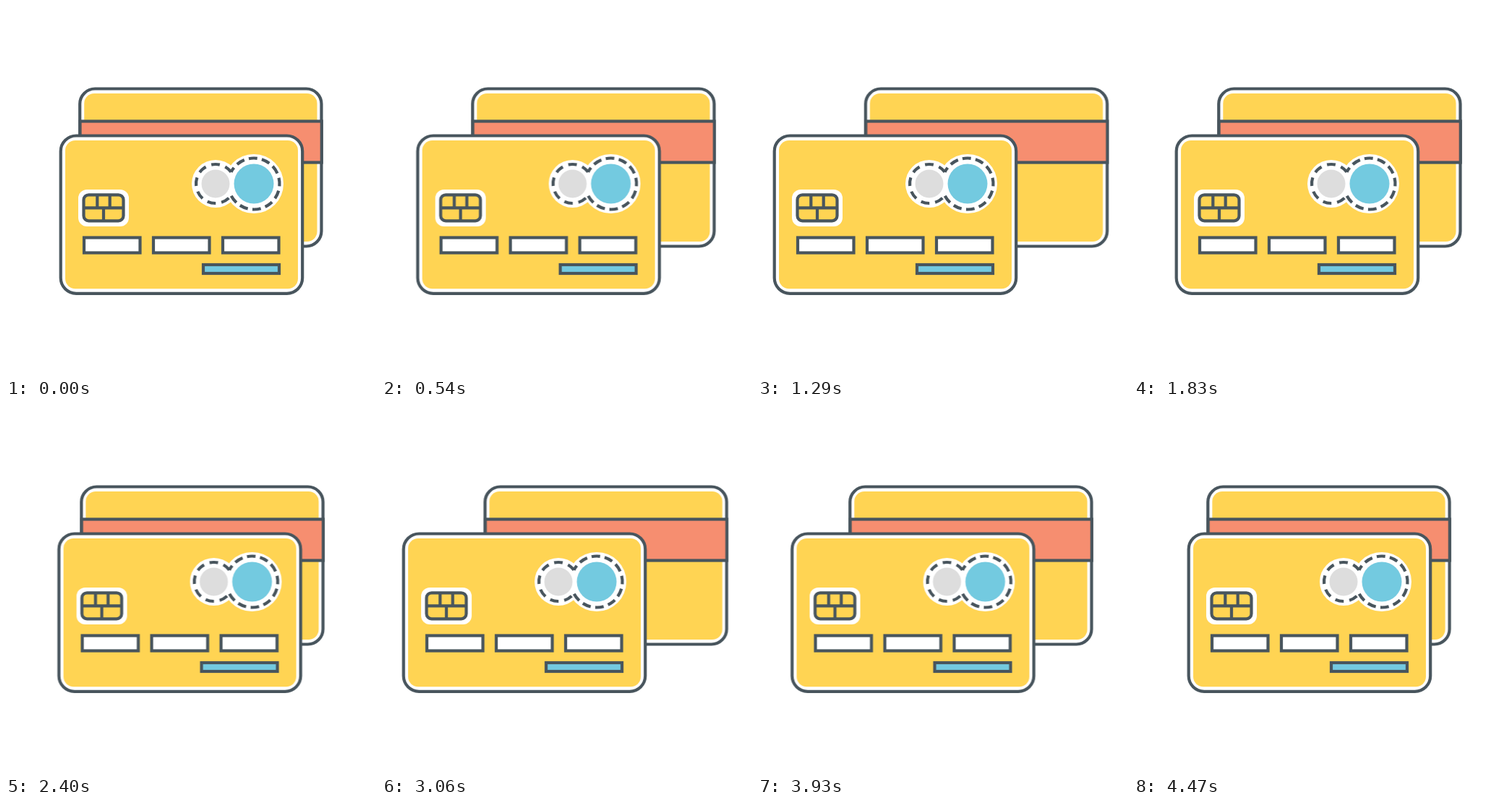
Recreate the animation shown at these times as an HTML page. Size 512 px wide and 512 px high, loop 4500 ms.

```html
<!DOCTYPE html>
<html lang="en">
<head>
<meta charset="utf-8">
<title>Bank cards</title>
<style>
  html, body { margin: 0; width: 100%; height: 100%; overflow: hidden; background: #fff; }
  svg { display: block; width: 100%; height: 100%; }
  .line { stroke: #48555d; stroke-width: 4.2; }
  .none { fill: none; }
  .white { fill: #fff; }
  .yellow { fill: #ffd453; }
  .coral { fill: #f68e70; }
  .blue { fill: #73cae0; }
  .grey { fill: #dddddd; }
  .card { animation: slide 1125ms cubic-bezier(.364, 0, .636, 1) infinite alternate; }
  .back { --shift: 49.3px; }
  .front { --shift: -56px; }
  @keyframes slide {
    from { transform: translateX(0); }
    to { transform: translateX(var(--shift)); }
  }
</style>
</head>
<body>
<svg viewBox="0 0 512 512">
  <g class="card back">
    <rect class="line white" x="102.2" y="114.5" width="334.3" height="218" rx="21"/>
    <rect class="yellow" x="108.2" y="121" width="322.3" height="205" rx="14"/>
    <rect class="line coral" x="102.5" y="159.5" width="334.3" height="57"/>
  </g>

  <g class="card front">
    <rect class="line white" x="75.7" y="179.5" width="334.5" height="218.3" rx="21.5"/>
    <rect class="yellow" x="82" y="186" width="322" height="205.3" rx="14"/>

    <!-- emblem: two discs inside one dashed outline -->
    <circle class="white" cx="290" cy="246" r="33"/>
    <circle class="white" cx="343" cy="246" r="41"/>
    <path class="line none" d="M311.5 229.7A35.5 35.5 0 1 1 311.5 262.3"
      pathLength="305.2" stroke-dasharray="19 10.3" stroke-dashoffset="7.5"/>
    <path class="line none" d="M311.5 262.3A27 27 0 1 1 311.5 229.7"
      pathLength="285.6" stroke-dasharray="25 17" stroke-dashoffset="31.7"/>
    <circle class="grey" cx="290" cy="246" r="19.5"/>
    <circle class="blue" cx="343" cy="246" r="27.5"/>

    <!-- chip -->
    <rect class="white" x="100" y="254" width="70" height="51" rx="12"/>
    <rect class="line yellow" x="107.5" y="261.3" width="55" height="36" rx="7"/>
    <path class="line none" d="M107.5 279.3h55M126.3 261.3v18M143.7 261.3v18M135 279.3v18"/>

    <!-- number fields -->
    <rect class="line white" x="108" y="320.5" width="77.5" height="21"/>
    <rect class="line white" x="204" y="320.5" width="77.5" height="21"/>
    <rect class="line white" x="300" y="320.5" width="77.5" height="21"/>
    <rect class="line blue" x="273" y="358" width="105" height="12"/>
  </g>
</svg>
</body>
</html>
```
